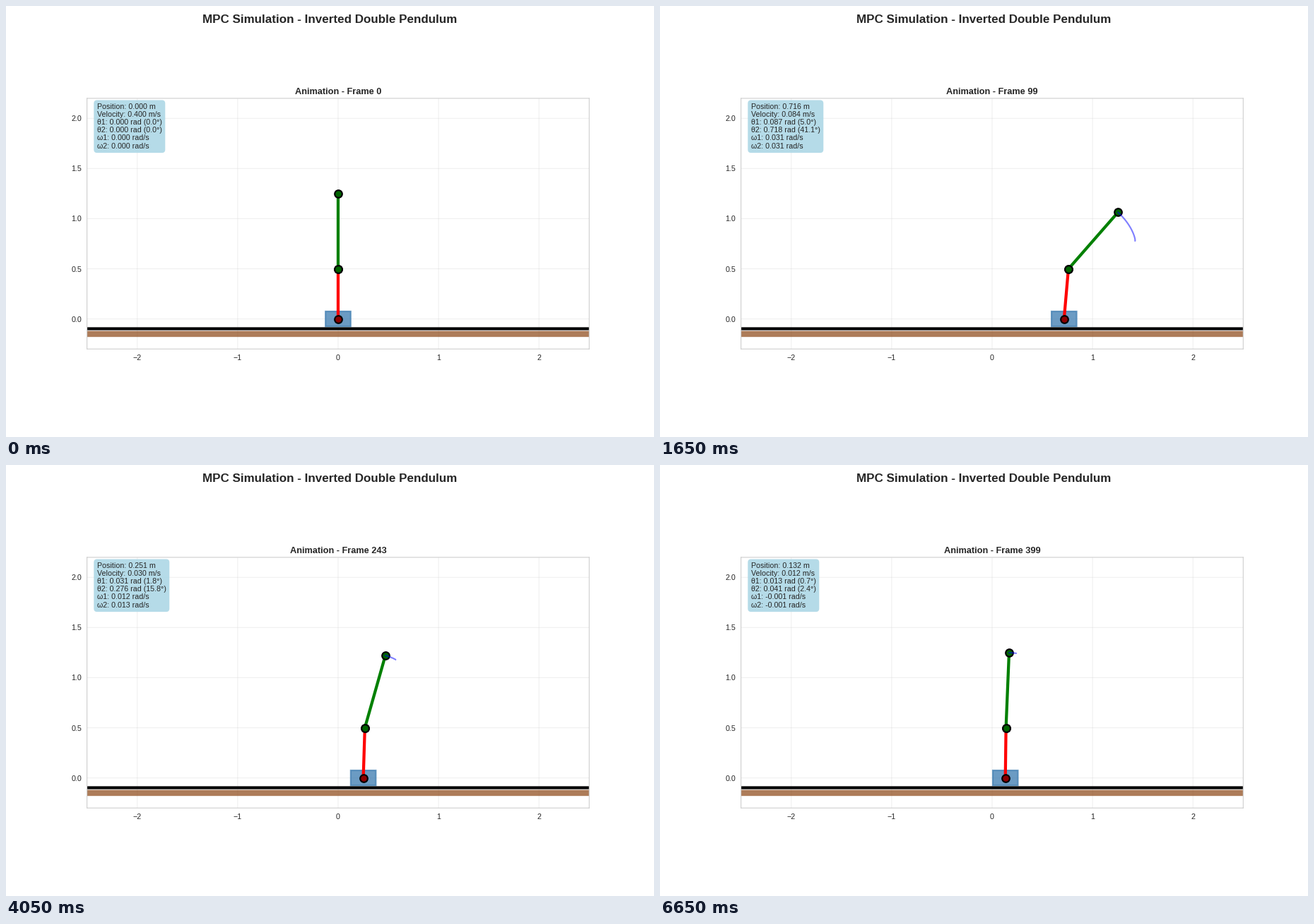
These frames come from a looping animation (917x611 px, 6.7 s). A matplotlib script:

```python
import matplotlib.pyplot as plt
import numpy as np
from matplotlib.animation import FuncAnimation
from matplotlib.patches import Rectangle

W, H, DPI = 917, 611, 100
PT = 0.764                      # layout points to figure points
DT, STEP, FRAMES = 0.05, 3, 134
L1, L2 = 0.5, 0.75
TRAIL = 20
INK = "0.15"

# One slow damped mode drives everything; a fast transient starts it from rest.
MODE = -0.1383 + 0.8672j
SETTLE = 5.0
CART = 2.347 * np.exp(1j * np.radians(61.3))
TILT = CART * 0.0845 * np.exp(1j * np.radians(22.7))

n_all = np.arange(STEP * (FRAMES - 1) + 1)
t = n_all * DT


def from_rest(z0):
    """Value and rate of a damped oscillation that begins at zero, at rest."""
    z = z0 * np.exp(MODE * t)
    m, dm = z0.real, (MODE * z0).real
    b, fade = dm + SETTLE * m, np.exp(-SETTLE * t)
    value = z.real - (m + b * t) * fade
    rate = (MODE * z).real - (b - SETTLE * (m + b * t)) * fade
    return np.round(value, 9) + 0.0, np.round(rate, 9) + 0.0


X, TH2 = from_rest(CART)
TH1, OM2 = from_rest(TILT)
kick = 0.4 * np.exp(-(t / 0.5) ** 2)
VEL = 0.976 * TH1 + kick
OM1 = 0.976 * OM2 - 8 * t * kick

plt.rcParams.update({
    "font.family": "Liberation Sans",
    "lines.solid_capstyle": "round",
    "path.snap": False,
})

fig, ax = plt.subplots(figsize=(W / DPI, H / DPI), dpi=DPI, facecolor="white")
fig.subplots_adjust(left=0.125, right=0.9, bottom=0.11, top=0.88)
fig.suptitle("MPC Simulation - Inverted Double Pendulum",
             fontsize=16 * PT, fontweight="bold", color=INK)

ax.set(xlim=(-2.5, 2.5), ylim=(-0.3, 2.2), aspect="equal",
       xticks=range(-2, 3), yticks=np.arange(0, 2.1, 0.5))
ax.set_axisbelow(True)
ax.grid(color="0.8", lw=PT, alpha=0.3)
ax.tick_params(length=0, pad=7 * PT, labelsize=10 * PT, labelcolor=INK)
for spine in ax.spines.values():
    spine.set(color="0.8", linewidth=PT)
title = ax.set_title("", fontsize=12 * PT, fontweight="bold",
                     color=INK, pad=6 * PT)

ax.add_patch(Rectangle((-3, -0.18), 6, 0.06, fc="saddlebrown", ec="none", alpha=0.7))
ax.plot([-3, 3], [-0.098, -0.098], color="black", lw=4 * PT)
cart = ax.add_patch(Rectangle((0, -0.075), 0.25, 0.15, fc="steelblue",
                              ec="steelblue", lw=2 * PT, alpha=0.8))


def rod(color, fill):
    return ax.plot([], [], "o-", color=color, lw=4 * PT, ms=10 * PT,
                   mfc=fill, mec="black", mew=2 * PT)[0]


lower = rod("red", "darkred")
upper = rod("green", "darkgreen")
trail, = ax.plot([], [], color="blue", lw=2 * PT, alpha=0.5)
info = ax.text(0.02, 0.98, "", transform=ax.transAxes, va="top",
               fontsize=10 * PT, color=INK, linespacing=1.14,
               bbox=dict(boxstyle="round,pad=0.43", fc="lightblue",
                         ec="none", alpha=0.9))


def angle(label, value):
    return f"{label}: {value:.3f} rad ({np.degrees(value):.1f}°)"


def draw(i):
    n = i * STEP
    x, a, b = X[n], TH1[n], TH2[n]
    jx, jy = x + L1 * np.sin(a), L1 * np.cos(a)
    cart.set_x(x - 0.125)
    lower.set_data([x, jx], [0, jy])
    upper.set_data([jx, jx + L2 * np.sin(b)], [jy, jy + L2 * np.cos(b)])

    # the trail replays recent angles around the present cart
    past = slice(max(0, n - TRAIL), n + 1)
    p, q = TH1[past], TH2[past]
    trail.set_data(x + L1 * np.sin(p) + L2 * np.sin(q),
                   L1 * np.cos(p) + L2 * np.cos(q))

    title.set_text(f"Animation - Frame {n}")
    info.set_text("\n".join([
        f"Position: {x:.3f} m",
        f"Velocity: {VEL[n]:.3f} m/s",
        angle("θ1", a),
        angle("θ2", b),
        f"ω1: {OM1[n]:.3f} rad/s",
        f"ω2: {OM2[n]:.3f} rad/s",
    ]))
    return cart, lower, upper, trail, title, info


anim = FuncAnimation(fig, draw, frames=FRAMES, init_func=lambda: draw(0),
                     interval=50, repeat=True, repeat_delay=0, blit=False)
plt.show()
```
